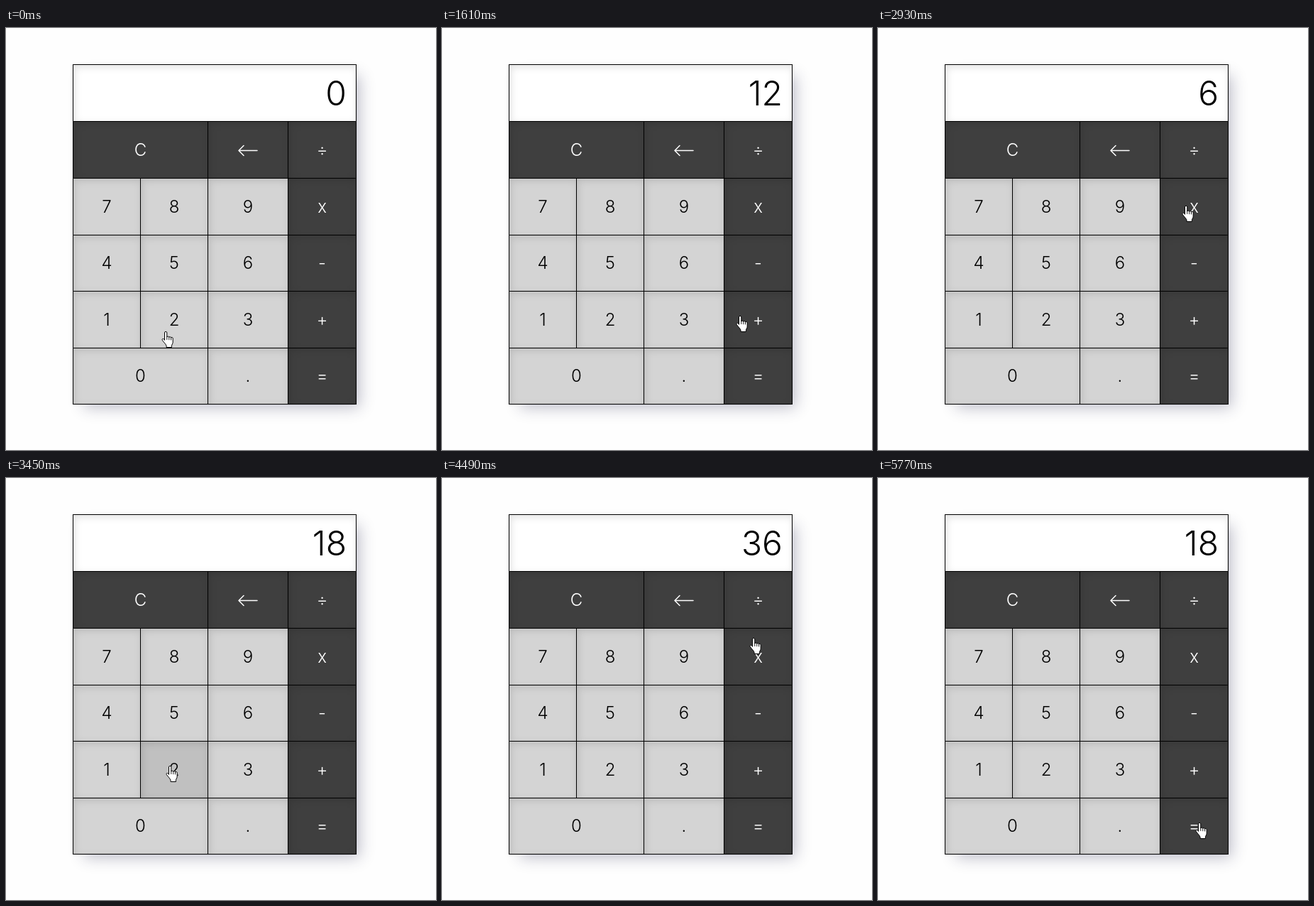
Animation of 606x594 px, one loop 5850 ms. Source, as an HTML page:

```html
<!DOCTYPE html>
<html lang="en">
<head>
<meta charset="utf-8">
<title>Calculator</title>
<style>
  html, body { margin: 0; width: 100%; height: 100%; overflow: hidden; background: #fefefe; }
  #stage { position: absolute; left: 0; top: 0; width: 606px; height: 594px; overflow: hidden;
    font: 300 24px Inter, "Open Sans", sans-serif; }
  #shade { position: absolute; left: 94px; top: 51px; width: 400px; height: 479px;
    box-shadow: 10px 10px 20px -6px rgba(35, 35, 75, .3); }
  .cell { position: absolute; box-sizing: border-box; border: 1px solid #000; color: #000;
    background: #d4d4d4; box-shadow: inset 2px 3px 11px rgba(0, 0, 0, .12);
    display: flex; align-items: center; justify-content: center; line-height: 1; }
  .dark { background: #3f3f3f; color: #fff; }
  .down { background: #c0c0c0; }
  #screen { background: #fff; font-size: 48px; justify-content: flex-end; padding-right: 13px; }
  svg { display: block; overflow: visible; fill: none; stroke-linecap: round; stroke-linejoin: round; }
  #hand { position: absolute; left: 0; top: 0; }
</style>
</head>
<body>
<div id="stage">
  <div id="shade"></div>
  <svg id="hand" width="18" height="24" stroke="#000">
    <path fill="#fff" d="M5 12.5V2.5a1.65 1.65 0 0 1 3.3 0V8.5c.3-1.2 2.8-1.2 3 .3c.4-1 2.6-.9 2.8.6c.5-.9 2.6-.6 2.6 1V15.5c0 2.5-1.6 3.6-1.8 5.3V23H7.6V21c-.6-2.4-3.8-5-5.6-7.8c-1.3-2 .8-3.2 2.2-1.6z"/>
    <path stroke-width=".9" d="M8.3 8.5V12M11.3 8.8V12.3M14.1 9.4V12.5"/>
  </svg>
</div>
<script>
const LOOP = 5850, FIRST = 330, STEP = 40, LAST = 5770;
const TRAVEL = 400, HOLD = 100;
const cols = [94, 189, 284, 397, 493];
const rows = [51, 131, 211, 291, 370, 450, 529];
const stage = document.getElementById('stage');
const hand = document.getElementById('hand');
const keys = {};

function addCell(label, col, row, span = 1, dark = false) {
  const el = document.createElement('div');
  const [left, right, top, bottom] = [cols[col], cols[col + span], rows[row], rows[row + 1]];
  el.className = dark ? 'cell dark' : 'cell';
  el.style.left = left + 'px';
  el.style.top = top + 'px';
  el.style.width = right - left + 1 + 'px';
  el.style.height = bottom - top + 1 + 'px';
  el.textContent = label;
  stage.insertBefore(el, hand);
  keys[label] = { el, dark, x: (left + right) / 2, y: (top + bottom) / 2 };
  return el;
}

const screen = addCell('', 0, 0, 4);
screen.id = 'screen';
addCell('C', 0, 1, 2, true);
addCell('', 2, 1, 1, true).innerHTML =
  '<svg width="28" height="16" stroke="#fff" stroke-width="1.5"><path d="M1 8.5H27M8 1.5L1 8.5L8 15.5"/></svg>';
['789', '456', '123'].forEach((line, r) =>
  [...line].forEach((digit, c) => addCell(digit, c, r + 2)));
addCell('0', 0, 5, 2);
addCell('.', 2, 5);
['÷', 'x', '-', '+', '='].forEach((sign, i) => addCell(sign, 3, i + 1, 1, true));

// The hand reaches each key at time t, a little off its centre
function press(label, t, dx = -5, dy = -5) {
  const key = keys[label];
  return { label, key, t, x: key.x + dx, y: key.y + dy };
}

const start = { t: 0, x: 226, y: 427 };
const presses = [
  press('1', 720, 29, 7), press('2', 1110), press('+', 1685), press('6', 2275),
  press('x', 2985), press('2', 3415), press('=', 3940), press('÷', 4600),
  press('2', 5225), press('=', 5650, 9)
];

const operate = {
  '+': (a, b) => a + b,
  '-': (a, b) => a - b,
  'x': (a, b) => a * b,
  '÷': (a, b) => a / b
};

// Runs the calculator over every key released by time t
function readout(t) {
  let text = '0', fresh = true, total = 0, sign = null;
  for (const { label, t: at } of presses) {
    if (at + HOLD > t) break;
    if (label >= '0' && label <= '9') {
      text = fresh ? label : text + label;
      fresh = false;
    } else {
      total = sign ? operate[sign](total, +text) : +text;
      text = String(total);
      sign = label === '=' ? null : label;
      fresh = true;
    }
  }
  return text;
}

function position(t) {
  let from = start;
  for (const to of presses) {
    if (t < to.t) {
      const leave = Math.max(from.t, to.t - TRAVEL);
      const u = Math.max(0, (t - leave) / (to.t - leave));
      const s = u * u * (3 - 2 * u);
      return [from.x + (to.x - from.x) * s, from.y + (to.y - from.y) * s];
    }
    from = to;
  }
  return [from.x, from.y];
}

function draw() {
  const now = performance.now() % LOOP;
  const t = now < FIRST ? 0 : Math.min(LAST, now - (now - FIRST) % STEP);
  const [x, y] = position(t).map(Math.round);
  hand.style.transform = `translate(${x - 7.5}px, ${y - .5}px)`;
  const held = presses.find(p => t >= p.t && t < p.t + HOLD);
  for (const key of Object.values(keys)) {
    key.el.classList.toggle('down', !key.dark && !!held && held.key === key);
  }
  const text = readout(t);
  if (screen.textContent !== text) screen.textContent = text;
  requestAnimationFrame(draw);
}
draw();
</script>
</body>
</html>
```
